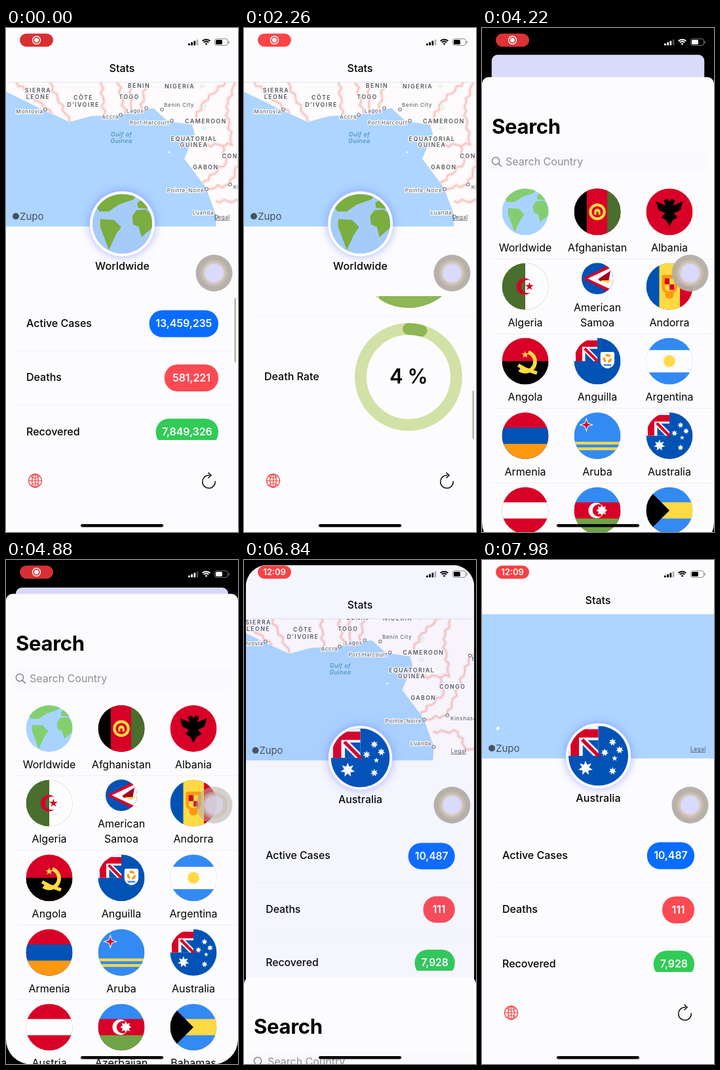
Recreate the animation shown at these times as an HTML page with a canvas. Size 354 by 767 pixels, loop 8000 ms.

```html
<!DOCTYPE html>
<html lang="en">
<head>
<meta charset="utf-8">
<title>Stats</title>
<style>
html, body { margin: 0; width: 100%; height: 100%; overflow: hidden; background: #000; }
canvas { display: block; width: 354px; height: 767px; }
</style>
</head>
<body>
<canvas id="stage"></canvas>
<script>
const W = 354, H = 767, LOOP = 8000, TAU = Math.PI * 2;
const OPEN = 3444, CLOSE = 6381, SPRING = 0.00674;
const PAPER = '#fcfcfe';
const RED = '#d80027', BLUE = '#0052b4', GREEN = '#6da544', DARK = '#496e2d',
      YELLOW = '#ffda44', SKY = '#338af3', ORANGE = '#ff9811', WHITE = '#fdfcff';
const canvas = document.getElementById('stage');
const c = canvas.getContext('2d');
const ratio = window.devicePixelRatio || 1;
canvas.width = W * ratio;
canvas.height = H * ratio;

// ---------- helpers ----------
const clamp = v => Math.min(1, Math.max(0, v));
const smooth = v => { v = clamp(v); return v * v * (3 - 2 * v); };
const easeOut = v => 1 - (1 - clamp(v)) ** 3;
const spring = ms => ms <= 0 ? 0 : 1 - (1 + SPRING * ms) * Math.exp(-SPRING * ms);

function scoped(draw) { c.save(); draw(); c.restore(); }
function rect(x, y, w, h, color) { c.fillStyle = color; c.fillRect(x, y, w, h); }
function round(x, y, w, h, r, color) {
  c.beginPath();
  c.roundRect(x, y, w, h, r);
  if (color) { c.fillStyle = color; c.fill(); }
}
function disc(x, y, r, color) {
  c.beginPath();
  c.arc(x, y, r, 0, TAU);
  c.fillStyle = color;
  c.fill();
}
function trace(p) {
  c.beginPath();
  for (let i = 0; i < p.length; i += 2) c.lineTo(p[i], p[i + 1]);
}
function poly(p, color) { trace(p); c.closePath(); c.fillStyle = color; c.fill(); }
function line(p, color, width) {
  trace(p);
  c.strokeStyle = color;
  c.lineWidth = width;
  c.stroke();
}
function arc(x, y, r, from, to, color, width) {
  c.beginPath();
  c.arc(x, y, r, from, to);
  c.strokeStyle = color;
  c.lineWidth = width;
  c.stroke();
}
function star(x, y, r, inner, n, color) {
  const p = [];
  for (let i = 0; i < 2 * n; i++) {
    const a = i * Math.PI / n - Math.PI / 2, q = i % 2 ? r * inner : r;
    p.push(x + q * Math.cos(a), y + q * Math.sin(a));
  }
  poly(p, color);
}
function crescent(x, y, r, d, r2, color) {
  const ix = (d * d + r * r - r2 * r2) / (2 * d), iy = Math.sqrt(r * r - ix * ix);
  const a = Math.atan2(iy, ix), b = Math.atan2(iy, ix - d);
  c.beginPath();
  c.arc(x, y, r, a, TAU - a);
  c.arc(x + d, y, r2, -b, b, true);
  c.fillStyle = color;
  c.fill();
}
function text(s, x, y, size, weight = 400, color = '#000', align = 'left', spacing = 0, halo) {
  c.font = `${weight} ${size}px Inter, sans-serif`;
  c.letterSpacing = spacing + 'px';
  c.textAlign = align;
  c.textBaseline = 'middle';
  if (halo) { c.strokeStyle = halo; c.lineWidth = 2.5; c.strokeText(s, x, y); }
  c.fillStyle = color;
  c.fillText(s, x, y);
}

// ---------- flags, drawn in a 512 unit box ----------
const THIRDS = [0, 167, 345];
function field(color) { rect(0, 0, 512, 512, color); }
function bands(colors, stops, vertical) {
  colors.forEach((color, i) => vertical
    ? rect(stops[i], 0, 512 - stops[i], 512, color)
    : rect(0, stops[i], 512, 512 - stops[i], color));
}
function canton() {
  field(BLUE);
  rect(0, 0, 256, 256, WHITE);
  rect(18, 28, 238, 72, RED);
  rect(18, 28, 72, 228, RED);
  poly([165, 122, 256, 122, 256, 213], BLUE);
  poly([122, 165, 122, 256, 213, 256], BLUE);
  line([117, 117, 260, 260], RED, 30);
}
function earth(land, sea) {
  field(sea);
  poly([30, 110, 100, 33, 240, 0, 380, 15, 350, 48, 225, 92, 140, 150, 60, 150], land);
  poly([67, 215, 183, 222, 246, 283, 200, 350, 140, 480, 65, 280], land);
  poly([340, 190, 378, 139, 460, 133, 520, 190, 512, 290, 420, 370, 398, 283, 348, 262], land);
  poly([385, 75, 440, 40, 512, 130, 390, 120], land);
}

const flags = {};
flags.Worldwide = () => earth('#83cf70', '#a9d3ff');
flags.Afghanistan = () => {
  bands(['#000', RED, DARK], [0, 140, 365], true);
  disc(256, 256, 92, YELLOW);
  disc(256, 256, 62, RED);
  round(222, 222, 68, 66, [34, 34, 0, 0], YELLOW);
  rect(244, 256, 24, 32, RED);
};
flags.Albania = () => {
  field(RED);
  for (const side of [-1, 1]) scoped(() => {
    c.translate(256, 0);
    c.scale(side, 1);
    poly([-1, 150, 20, 112, 62, 130, 40, 188, 148, 142, 120, 236, 50, 268, 86, 318, 34, 350, -1, 415], '#000');
  });
};
flags.Algeria = () => {
  bands([DARK, WHITE], [0, 256], true);
  crescent(250, 256, 90, 32, 72, RED);
  star(302, 256, 48, .4, 5, RED);
};
flags['American Samoa'] = () => {
  field(BLUE);
  poly([512, 0, 20, 256, 512, 512], RED);
  poly([512, 62, 100, 256, 512, 450], WHITE);
  poly([270, 262, 470, 130, 440, 290, 300, 300], '#a2001d');
  poly([300, 285, 490, 285, 420, 330], YELLOW);
};
flags.Andorra = () => {
  bands([BLUE, YELLOW, RED], [0, 144, 372], true);
  round(172, 130, 170, 205, [20, 20, 70, 70], ORANGE);
  round(210, 300, 92, 90, 40, ORANGE);
  round(204, 168, 106, 140, [0, 0, 45, 45], YELLOW);
  rect(204, 168, 53, 65, RED);
  rect(257, 233, 50, 60, RED);
};
flags.Angola = () => {
  bands([RED, '#000'], [0, 256]);
  arc(256, 262, 108, -1.25, 2.2, YELLOW, 42);
  line([178, 300, 260, 345, 385, 388], YELLOW, 38);
  star(255, 185, 42, .4, 5, YELLOW);
};
flags.Anguilla = () => {
  canton();
  round(290, 155, 154, 180, [20, 20, 77, 77], WHITE);
  for (let a = 0; a < 6; a += TAU / 3) arc(367, 228, 36, a, a + 1.4, ORANGE, 25);
  rect(325, 290, 84, 18, SKY);
};
flags.Argentina = () => {
  bands([SKY, WHITE, SKY], [0, 135, 380]);
  star(256, 256, 76, .72, 14, YELLOW);
};
flags.Armenia = () => bands([RED, BLUE, ORANGE], THIRDS);
flags.Aruba = () => {
  bands([SKY, YELLOW, SKY, YELLOW, SKY], [0, 322, 352, 384, 414]);
  star(135, 136, 80, .34, 4, WHITE);
  star(135, 136, 55, .34, 4, RED);
};
flags.Australia = () => {
  canton();
  star(146, 361, 64, .5, 7, WHITE);
  for (const [x, y] of [[378, 139], [311, 228], [439, 205], [378, 386]]) star(x, y, 34, .5, 7, WHITE);
  star(396, 278, 26, .42, 5, WHITE);
};
flags.Austria = () => bands([RED, WHITE, RED], THIRDS);
flags.Azerbaijan = () => {
  bands([SKY, RED, GREEN], THIRDS);
  crescent(244, 256, 86, 27, 68, WHITE);
  star(305, 256, 62, .62, 8, WHITE);
};
flags.Bahamas = () => {
  bands([SKY, YELLOW, SKY], THIRDS);
  poly([0, 0, 256, 256, 0, 512], '#000');
};
const countries = ['Worldwide', 'Afghanistan', 'Albania', 'Algeria', 'American Samoa', 'Andorra', 'Angola',
  'Anguilla', 'Argentina', 'Armenia', 'Aruba', 'Australia', 'Austria', 'Azerbaijan', 'Bahamas'];

function badge(x, y, r, draw) {
  scoped(() => {
    c.translate(x - r, y - r);
    c.scale(r / 256, r / 256);
    c.beginPath();
    c.arc(256, 256, 256, 0, TAU);
    c.clip();
    draw();
  });
}

// ---------- map ----------
const africa = [-60, 0, -60, 60, 0, 97, 60, 126, 97, 143, 130, 134, 175, 132, 225, 122, 247, 142,
  284, 147, 288, 161, 272, 199, 305, 243, 321, 286, 317, 351, 371, 559, 512, 516, 560, 420,
  614, 354, 598, 257, 641, 192, 728, 73, 728, 0];
const madagascar = [709, 322, 721, 359, 685, 462, 650, 450, 658, 365];
const westBorders = [
  [10, 78, 70, 130], [64, 78, 97, 142], [145, 78, 150, 133], [170, 78, 182, 130], [190, 78, 192, 126],
  [214, 78, 207, 123], [340, 78, 302, 112, 284, 146], [350, 83, 336, 120, 345, 178, 286, 178],
  [330, 178, 336, 205, 298, 238]
];
const eastBorders = [
  [306, 245, 342, 238, 378, 146, 470, 136, 498, 110], [320, 263, 358, 264, 372, 292, 408, 290, 440, 322, 480, 362],
  [515, 130, 492, 210, 474, 290, 500, 350], [496, 206, 560, 214, 600, 250],
  [560, 120, 545, 195], [498, 290, 575, 306, 614, 303]
];
// Bends each straight piece a little so that it reads as a drawn frontier.
function wander(p) {
  const out = [p[0], p[1]];
  for (let i = 2; i < p.length; i += 2) {
    const x = p[i - 2], y = p[i - 1], dx = p[i] - x, dy = p[i + 1] - y;
    const length = Math.hypot(dx, dy), n = Math.ceil(length / 7);
    for (let k = 1; k <= n; k++) {
      const f = k / n, bend = k < n ? 2.6 * Math.sin(k * 2.3 + x) / length : 0;
      out.push(x + dx * f - dy * bend, y + dy * f + dx * bend);
    }
  }
  return out;
}
const borders = westBorders.concat(eastBorders).map(wander);
const regions = [
  [49, 95, 'SIERRA'], [49, 105, 'LEONE'], [118, 106, 'CÔTE'], [118, 117, 'D’IVOIRE'], [188, 105, 'TOGO'],
  [203, 88, 'BENIN'], [265, 89, 'NIGERIA'], [305, 142, 'CAMEROON'], [287, 169, 'EQUATORIAL'], [287, 178, 'GUINEA'],
  [305, 212, 'GABON'], [350, 195, 'CONGO'], [366, 324, 'ANGOLA']
];
['DEMOCRATIC', 'REPUBLIC', 'OF THE', 'CONGO'].forEach((s, i) => regions.push([427, 192 + 10.3 * i, s]));
const paleRegions = [
  [526, 181, 'UGANDA'], [578, 187, 'KENYA'], [497, 214, 'RWANDA'], [499, 229, 'BURUNDI'],
  [552, 261, 'TANZANIA'], [482, 346, 'ZAMBIA'], [535, 335, 'MALAWI']
];
const cities = [
  [60, 124, -24, 4, 'Monrovia'], [175, 132, -16, 4, 'Accra'], [214, 122, -17, 5, 'Lagos'],
  [238, 124, 26, -6, 'Benin City'], [253, 141, -34, 4, 'Port Harcourt'], [306, 245, -32, 3, 'Pointe-Noire'],
  [321, 287, -20, -5, 'Luanda'], [377, 146, 18, 5, 'Bangui'], [342, 238, 25, 5, 'Kinshasa'],
  [431, 257, 25, -4, 'Bakwanga'], [325, 321, -18, -2, 'Lobito'], [570, 205, 20, 0, 'Nairobi']
];
function drawLand() {
  poly(africa, '#fefbfc');
  poly(madagascar, '#fefbfc');
  scoped(() => {
    trace(africa);
    c.clip();
    c.globalAlpha = .55;
    for (let i = 0; i < 70; i++) {
      c.beginPath();
      c.ellipse((i * 97.3) % 680, 80 + (i * 61.7) % 400, 3 + i % 4, 2 + i % 5, i, 0, TAU);
      c.fillStyle = i % 3 ? '#d9f3da' : '#d3eef4';
      c.fill();
    }
    c.globalAlpha = 1;
    for (const b of borders) line(b, '#fde7e9', 6);
    for (const b of borders) line(b, '#f3c3b9', 1.8);
  });
}
function drawMap(t) {
  const pan = smooth((t - 6620) / 2595);
  scoped(() => {
    const sea = '#add5ff';
    c.beginPath();
    c.rect(0, 83, W, 219);
    c.clip();
    rect(0, 83, W, 219, sea);
    c.translate(-1440 * pan, -290 * pan);
    c.lineJoin = 'round';
    drawLand();
    poly([517, 190, 540, 189, 543, 203, 527, 208], sea);
    line([493, 232, 497, 252, 507, 276], sea, 4);
    line([548, 305, 552, 345], sea, 4);
    disc(797, 412, 2.5, '#fff');
    disc(249, 189, 1.5, '#fff');
    for (const [x, y, name] of regions) text(name, x, y, 8.8, 600, '#55525a', 'center', 1.5, '#fff');
    for (const [x, y, name] of paleRegions) text(name, x, y, 8.8, 600, '#b7aec4', 'center', 1.5, '#fff');
    for (const [x, y, dx, dy, name] of cities) {
      text(name, x + dx, y + dy, 8.2, 500, '#68656d', 'center', .6, '#fff');
      disc(x, y, 2.8, '#77727a');
      disc(x, y, 1.7, '#fff');
    }
    text('Gulf of', 176, 162, 9, 'italic 500', '#4391bd', 'center', .5);
    text('Guinea', 176, 172, 9, 'italic 500', '#4391bd', 'center', .5);
  });
  disc(15, 286.5, 5, '#47525e');
  text('Zupo', 21, 287, 15, 400, '#47525e');
  text('Legal', 318, 288, 8.5, 400, '#4d5662', 'left', .4);
  rect(318, 292, 23, .8, '#4d5662');
}

// ---------- stats screen ----------
function scrollAt(t) {
  const down = 200 * easeOut((t - 250) / 750) + 203 * easeOut((t - 1100) / 800);
  return down * (1 - smooth((t - 2450) / 700));
}
function statRow(name, value, color, y) {
  text(name, 31, y, 16, 500);
  const digits = value.replace(/,/g, '').length, width = 19 + 10 * digits + 3.2 * (value.length - digits);
  round(324 - width, y - 20.5, width, 41, 20, color);
  text(value, 324 - width / 2, y + .5, 16, 600, '#fff', 'center', -.1);
}
function rateRow(name, percent, y) {
  text(name, 31, y, 16, 500);
  arc(251, y, 73, 0, TAU, '#d2e1a6', 18);
  c.lineCap = 'round';
  arc(251, y, 73, -TAU / 4, TAU * (percent / 100 - .25), '#8db654', 18);
  c.lineCap = 'butt';
  text(Math.floor(percent) + ' %', 251, y + 1, 31, 600, '#000', 'center', -.5);
}
function drawList(t, values) {
  const scroll = scrollAt(t);
  scoped(() => {
    c.beginPath();
    c.rect(0, 408, W, 219);
    c.clip();
    scoped(() => {
      c.translate(0, -scroll);
      statRow('Active Cases', values[0], '#0a6cff', 450);
      statRow('Deaths', values[1], '#fc4a53', 532.5);
      statRow('Recovered', values[2], '#31cb56', 615);
      rateRow('Recovery Rate', 58.3, 747);
      rateRow('Death Rate', 4.3, 934);
      for (const y of [491, 573, 655, 840]) rect(16, y, W, .7, '#efeff2');
    });
    const part = scroll / 403;
    c.globalAlpha = 1 - clamp((t - 3250) / 250);
    round(348.5, 411 + part * 141, 2.5, 98 - 25 * part, 1.2, '#b9afa0');
  });
}
function drawToolbar() {
  const red = '#f8403c';
  scoped(() => {
    c.translate(44.5, 689);
    arc(0, 0, 10, 0, TAU, red, 1.3);
    c.beginPath();
    c.ellipse(0, 0, 4.8, 10, 0, 0, TAU);
    c.stroke();
    line([0, -10, 0, 10], red, 1.1);
    line([-10, 0, 10, 0], red, 1.1);
    arc(0, -13, 9, .72, Math.PI - .72, red, 1.1);
    arc(0, 13, 9, Math.PI + .72, TAU - .72, red, 1.1);
  });
  arc(309.5, 690.5, 9.8, -.1, TAU - 1.45, '#111', 1.6);
  line([308.5, 676.5, 313, 680.8, 308.5, 685], '#111', 1.6);
}
function drawStats(t) {
  const picked = t >= CLOSE;
  rect(0, 0, W, H, PAPER);
  text('Stats', 177, 62.5, 16, 500, '#000', 'center');
  rect(0, 82.5, W, .8, '#c9c9ce');
  drawMap(t);
  scoped(() => {
    c.shadowColor = 'rgba(105,115,255,.55)';
    c.shadowBlur = 14 * ratio;
    disc(177.5, 298, 49.5, '#fff');
  });
  badge(177.5, 298, 45.5, picked ? flags.Australia : () => earth('#7bad40', '#a5cbf8'));
  text(picked ? 'Australia' : 'Worldwide', 177.5, 363, 16, 500, '#000', 'center', .1);
  drawList(t, picked ? ['10,487', '111', '7,928'] : ['13,459,235', '581,221', '7,849,326']);
  drawToolbar();
}

// ---------- search sheet ----------
function drawSheet(top) {
  scoped(() => {
    c.translate(0, top);
    round(0, 0, W, H - 51, [10, 10, 38, 38], PAPER);
    c.clip();
    text('Search', 15, 77, 31, 700, '#000', 'left', -.3);
    round(8, 112, 338, 34, 9, '#faf9fc');
    arc(21, 127.5, 5.6, 0, TAU, '#85818d', 1.5);
    line([25, 131.5, 30, 136.5], '#85818d', 1.6);
    text('Search Country', 36, 129.5, 16, 400, '#918d9a');
    countries.forEach((name, i) => {
      const x = 66 + 110 * (i % 3), y = 205 + 113.6 * Math.floor(i / 3);
      const words = name.split(' '), tall = words.length > 1;
      badge(x, tall ? y - 12 : y, tall ? 24 : 35.5, flags[name]);
      words.forEach((word, k) =>
        text(word, x, y + 55.5 - 23 * (words.length - 1 - k), 16, 400, '#000', 'center'));
      if (i % 3 === 0) rect(16, y + 71.5, W, .7, '#e9e8ed');
    });
  });
}

// ---------- system overlays ----------
function drawStatusBar(t, p) {
  const glow = .5 - .5 * Math.cos(TAU * t / 4880);
  round(21, 8.5, 51, 20, 10, `rgb(${216 + 38 * glow},${48 + 20 * glow},${50 + 20 * glow})`);
  if (t < 5600) {
    arc(46.5, 18.5, 6, 0, TAU, '#fff', 1.4);
    disc(46.5, 18.5, 3.4, '#fff');
  } else {
    text('12:09', 46.5, 19, 13, 600, '#fff', 'center');
  }
  const v = 255 * clamp((p - .6) / .3), ink = `rgb(${v},${v},${v})`;
  for (let i = 0; i < 4; i++) {
    c.globalAlpha = i < 3 ? 1 : .3;
    round(278 + i * 4.2, 23.5 - i * 2, 2.8, 3 + i * 2, .8, ink);
  }
  c.globalAlpha = 1;
  const from = -TAU / 4 - .75, to = from + 1.5;
  for (const r of [8.6, 5.4]) arc(305.5, 26, r, from, to, ink, 2);
  arc(305.5, 26, 1.4, from, to, ink, 2.8);
  c.globalAlpha = .45;
  round(318.5, 16.5, 20, 10, 3);
  c.lineWidth = 1;
  c.stroke();
  round(339.5, 20, 1.3, 3.5, .6, ink);
  c.globalAlpha = 1;
  round(320, 18, 10, 7, 1.6, ink);
}
function drawTouch(t) {
  scoped(() => {
    c.globalAlpha = .95 - .4 * (smooth((t - 4200) / 600) - smooth((t - 6150) / 200));
    disc(317.5, 373, 28, '#b4ada6');
    disc(317.5, 373, 20.5, '#c6bdb0');
    disc(317.5, 373, 17, '#d6cbc4');
    disc(317.5, 373, 14, '#dadaff');
  });
}

function draw(t) {
  let p = t < CLOSE ? spring(t - OPEN) : 1 - spring(t - CLOSE);
  if (p < .002) p = 0;
  c.setTransform(ratio, 0, 0, ratio, 0, 0);
  rect(0, 0, W, H, '#000');
  scoped(() => {
    const scale = 1 - .085 * p;
    c.translate(W / 2 * (1 - scale), 42 * p);
    c.scale(scale, scale);
    if (p) {
      round(0, 0, W, H, 38 - 28 * p);
      c.clip();
    }
    drawStats(t);
    rect(0, 0, W, H, `rgba(110,110,240,${.25 * p})`);
  });
  if (p) drawSheet(H - 716 * p);
  drawStatusBar(t, p);
  drawTouch(t);
  round(114, 755, 126, 4.5, 2.2, '#000');
}
function frame() {
  draw(performance.now() % LOOP);
  requestAnimationFrame(frame);
}
frame();
</script>
</body>
</html>
```
